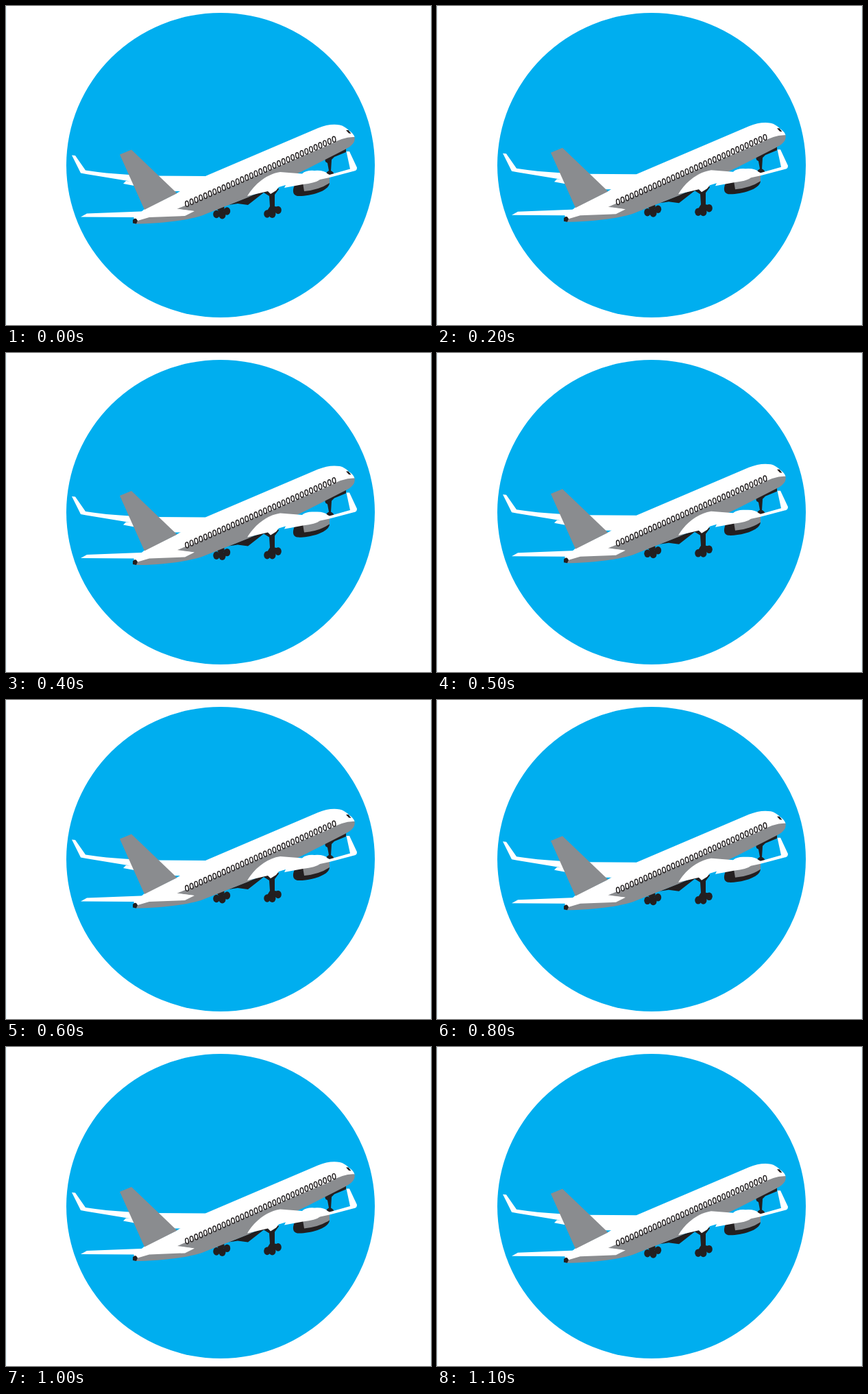
Write an HTML page that moves like this. It is 620 px wide and 465 px high and loops after 1200 ms.

```html
<!DOCTYPE html>
<html lang="en">
<head>
<meta charset="utf-8">
<title>Airliner</title>
<style>
html, body { margin: 0; width: 100%; height: 100%; overflow: hidden; background: #fff; }
svg { display: block; }
.white { fill: #fff; }
.gray { fill: #8a8c8f; }
.black { fill: #231f20; }
#windows { fill: #fff; stroke: #231f20; stroke-width: 1.4; }
</style>
</head>
<body>
<svg width="620" height="465" viewBox="0 0 620 465">
  <path d="M.5 0V465M619.5 0V465" stroke="#e2f8ff"/>
  <ellipse cx="313" cy="232" rx="225" ry="222" fill="#00aeef"/>
  <g id="plane">
    <!-- far wing -->
    <path class="white" d="M96 217.5L101 218L116 239.5Q145 244 180 246L215 247.5L292 248L260 270H215L187 262L171 259L175 255L181 255.5L117 245L109 243.5Z"/>
    <!-- landing gear -->
    <g class="black">
      <path d="M465 222L496 208V213L479 220L475 224L474 240Q480 243 478 248H468Q465 243 471 240L469 229L466 227Z"/>
      <path d="M325 290L352 279L395 262L398 267L392 275V292L397 293V300L387 303L380 300L385 292L384 277L376 272L353 290L338 288Z"/>
      <path d="M308 296L318 291L319 298L312 303Z"/>
      <ellipse cx="307" cy="303.5" rx="4.8" ry="5.8"/>
      <ellipse cx="315.5" cy="304.5" rx="5" ry="6"/>
      <ellipse cx="322.5" cy="299" rx="4.7" ry="5.7"/>
      <ellipse cx="381" cy="303" rx="4.8" ry="5.8"/>
      <ellipse cx="388.5" cy="303" rx="5" ry="6"/>
      <ellipse cx="397" cy="297.5" rx="4.8" ry="5.8"/>
    </g>
    <!-- fuselage -->
    <path class="white" d="M292 247.5L455 178Q472 171 487 173.5Q494 175 501 182Q507 186 508.5 191L480 202L280 300L192 312L186 310L202 296L249 273Z"/>
    <path class="gray" d="M508.5 191C510 200 503 205 494 209.5L440 237L353 279L325 290L292 303C270 313 220 317.5 188 317.5L192 312L210 307L262 305L274 299L249 296L470 203Q493 190 508.5 191Z"/>
    <path class="black" d="M496 181L499.5 181L503.5 186L500 185.5Z"/>
    <!-- tail -->
    <path class="gray" d="M166 216.5L183 209.5L249.5 273L202 297Z"/>
    <path class="white" d="M109 307.5L118 302.5L196 299.5L249 295.5L275 299L261 306L209 308L192 313L186 308Z"/>
    <path class="black" d="M185 312Q187 309 190 310L192 313L190 317.5L185 316.5Z"/>
    <g id="windows"></g>
    <!-- engine and near wing -->
    <path class="black" d="M421 261C417 270 419 276 425 277C440 278 471 271 472 258L472 247Z"/>
    <path class="gray" d="M433 258L472 246V258Q457 268 435 270Z"/>
    <path class="white" d="M352 277C362 260 380 245 400 242L432 244.5Q438 239 450 240Q464 239 469 244.5L472 246L502 237.5L496.500 212L501 212L512 235.5Q512 240 508 240.500L472 250L458 253Q452 258 433 260L406 265L408 261L398 264L394 269L386 274L382 270Z"/>
  </g>
</svg>
<script>
const plane = document.getElementById("plane");
const count = 33;
let ovals = "";
for (let i = 0; i < count; i++) {
  const k = i / (count - 1);
  ovals += `<ellipse rx="2.3" ry="4.1" transform="translate(${264 + 214.5 * k} ${288.300 - 94 * k}) rotate(-8)"/>`;
}
document.getElementById("windows").innerHTML = ovals;

// Five steps up, five down, with a double hold at each end.
function draw(now) {
  const n = Math.floor(now / 100) % 12;
  const step = n < 7 ? Math.max(0, n - 1) : 12 - n;
  plane.setAttribute("transform", `translate(0 ${-2.8 * step})`);
  requestAnimationFrame(draw);
}
const start = performance.now();
requestAnimationFrame(function tick() {
  const n = Math.floor((performance.now() - start) / 100) % 12;
  const step = n < 7 ? Math.max(0, n - 1) : 12 - n;
  plane.setAttribute("transform", `translate(0 ${-2.8 * step})`);
  requestAnimationFrame(tick);
});
</script>
</body>
</html>
```
